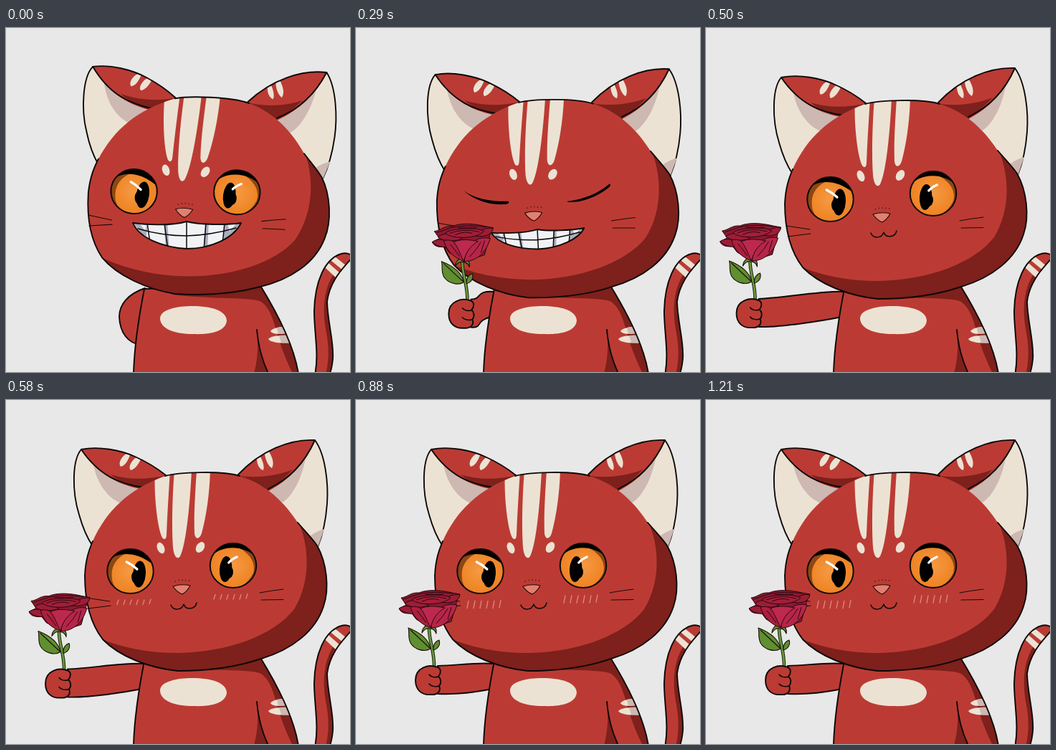
Animation, 480 px wide and 480 px high, one loop 1.25 s. Source, as an HTML page:

```html
<!DOCTYPE html>
<html lang="en">
<head>
<meta charset="utf-8">
<title>Cat with a rose</title>
<style>
  html, body { margin: 0; width: 100%; height: 100%; overflow: hidden; background: #e8e8e8; }
  svg { display: block; width: 100%; height: 100%; }
  .red { fill: #bb3b34; }
  .dark { fill: #7e201b; }
  .cream { fill: #ece2d3; }
  .mauve { fill: #cdb8b2; }
  .line { fill: none; }
  .ink { stroke: #0d0808; stroke-width: 1.9; stroke-linecap: round; stroke-linejoin: round; }
  .thin { stroke: #1c0a08; stroke-width: 1.1; stroke-linecap: round; stroke-linejoin: round; }
  .petal { stroke: #2b0710; stroke-width: 1; stroke-linejoin: round; }
  #grin path { vector-effect: non-scaling-stroke; }
</style>
</head>
<body>
<svg viewBox="0 0 480 480">
  <defs>
    <path id="skullShape" d="M222 106C240 101 300 98 326 106C365 118 390 145 407 171C420 186 428 194 434 203C447 226 452 262 443 288C432 322 400 348 356 361C318 374 280 378 240 378C200 374 158 358 135 334C115 308 110 275 110 245C111 222 116 209 121 197C140 155 170 125 222 106Z"/>
    <path id="bodyShape" d="M193 364C186 400 179 440 178 482L408 482C402 445 380 400 354 358Z"/>
    <path id="tailShape" d="M431 484C437 455 430 425 430 395C431 355 444 322 468 315C474 313 482 315 483 320C474 332 452 350 448 382C449 412 458 440 456 462C455 472 453 480 451 484Z"/>
    <path id="lips" d="M177 272C192 274 228 277 252 270C270 275 308 275 328 272C318 293 286 308 252 308C218 306 186 293 177 272Z"/>
    <clipPath id="skullClip"><use href="#skullShape"/></clipPath>
    <clipPath id="bodyClip"><use href="#bodyShape"/></clipPath>
    <clipPath id="tailClip"><use href="#tailShape"/></clipPath>
    <clipPath id="lipsClip"><use href="#lips"/></clipPath>
    <clipPath id="eyeClip"><circle r="31"/></clipPath>
    <radialGradient id="iris">
      <stop offset="0" stop-color="#f59a44"/>
      <stop offset="1" stop-color="#ee8222"/>
    </radialGradient>
  </defs>

  <g id="tail">
    <use href="#tailShape" class="red"/>
    <g clip-path="url(#tailClip)">
      <path class="dark" d="M456 345C442 368 442 396 446 420C451 445 451 462 446 484H462V345Z"/>
      <path class="cream" d="M453 324L459 319L475 332L470 338ZM445 334L450 328L466 342L461 349Z"/>
    </g>
    <use href="#tailShape" class="line ink"/>
  </g>

  <path id="arm" class="red ink"/>

  <g id="body">
    <use href="#bodyShape" class="red"/>
    <g clip-path="url(#bodyClip)">
      <path class="dark" d="M232 372C290 379 342 375 356 382C369 391 374 410 380 432C386 452 394 470 401 484H420V350H232Z"/>
      <path class="dark" d="M350 421C352 445 358 465 366 482H346C352 460 352 440 350 421Z"/>
      <path class="cream" d="M369 423C373 418 382 417 390 417L392 426C384 427 372 428 369 423ZM366 434C372 428 386 429 398 429V439C388 440 370 440 366 434Z"/>
      <path class="mauve" d="M378 418L392 416V426L380 427ZM381 429L398 428V440L384 439Z"/>
    </g>
    <path class="cream" d="M215 405C216 392 240 388 260 388C286 388 307 394 308 408C307 424 284 428 261 427C236 427 215 420 215 405Z"/>
    <path class="line ink" d="M350 421C352 445 358 465 366 482"/>
    <use href="#bodyShape" class="line ink"/>
  </g>

  <g id="head">
    <g id="leftEar">
      <path class="cream ink" d="M105 69C92 84 92 128 102 160C107 178 113 192 121 204L222 110Z"/>
      <path class="mauve" d="M121 83C124 112 140 136 160 144L205 118Z"/>
      <path class="red" d="M105 69C130 64 160 70 180 79C200 88 212 96 225 107L193 125C160 120 130 106 105 69Z"/>
      <path class="dark" d="M146 104C168 111 195 112 225 105L194 125C172 121 158 114 146 104Z"/>
      <path class="cream" d="M168 75C161 79 156 88 160 93C166 92 170 85 173 77ZM182 80C175 84 170 94 174 98C181 96 185 89 188 83Z"/>
      <path class="line ink" d="M193 122C160 118 130 106 105 69C130 64 160 70 180 79C200 88 212 96 223 105"/>
    </g>
    <g id="rightEar">
      <path class="cream ink" d="M431 56C446 76 450 118 448 145C446 172 442 188 435 205L330 110Z"/>
      <path class="mauve" d="M419 76C414 108 400 134 386 143L350 118ZM424 190C432 184 440 181 444 180L435 206Z"/>
      <path class="red" d="M431 56C396 54 355 71 322 106L366 127C392 114 416 90 431 56Z"/>
      <path class="dark" d="M322 105C348 110 378 106 400 97C390 108 378 118 366 127Z"/>
      <path class="cream" d="M350 82C350 90 354 97 359 98C361 92 358 85 355 79ZM361 75C362 84 366 92 371 95C375 88 371 79 367 72Z"/>
      <path class="line ink" d="M366 124C392 112 416 90 431 56C396 54 355 71 324 104"/>
    </g>

    <use href="#skullShape" class="red"/>
    <g clip-path="url(#skullClip)">
      <path class="dark" d="M398 152C424 190 428 250 402 292C374 328 310 352 240 353C200 353 160 346 124 330L140 400H460V180Z"/>
      <path class="cream" d="M208 98C206 130 211 178 218 192C221 196 224 194 224 188C225 160 227 130 229 98ZM235 98C232 135 231 180 233 205C234 218 239 224 243 218C252 200 257 140 259 98ZM266 98C264 130 262 160 263 186C264 195 270 195 273 186C280 160 284 130 285 98Z"/>
    </g>
    <path class="line ink" d="M222 106C240 101 300 98 326 106M407 171C420 186 428 194 434 203C447 226 452 262 443 288C432 322 400 348 356 361C318 374 280 378 240 378C200 374 158 358 135 334C115 308 110 275 110 245C111 222 116 209 121 197"/>
    <ellipse class="cream" rx="5" ry="8" transform="translate(216 206.5) rotate(-22)"/>
    <ellipse class="cream" rx="5.5" ry="8" transform="translate(271 205.5) rotate(32)"/>
    <path class="line thin" d="M112 276L145 281M114 291Q130 289 146 287M354 269Q370 266 387 264M356 279L387 278.5"/>

    <g id="open">
      <g transform="translate(173.5 239) scale(1.04 1)">
        <circle r="31" fill="url(#iris)"/>
        <g clip-path="url(#eyeClip)">
          <path fill="#8c4713" d="M-32 16V-34H28C-4 -31 -30 -18 -24 14Q-22 22 -14 30Z"/>
          <path d="M-34 -8C-26 -26 6 -33 34 -6V-36H-34Z"/>
        </g>
        <ellipse rx="8.6" ry="18.5" transform="translate(12 4) rotate(4)"/>
        <ellipse rx="5.5" ry="9" transform="translate(7 8)"/>
        <path d="M-5 -13Q3 -9 9 -3" fill="none" stroke="#fff" stroke-width="3.2" stroke-linecap="round"/>
        <circle r="31" class="line ink"/>
      </g>
      <g transform="translate(317 231) scale(1.04 1)">
        <circle r="31" fill="url(#iris)"/>
        <g clip-path="url(#eyeClip)">
          <path fill="#8c4713" d="M32 16V-34H-24C6 -31 33 -14 27 10Q22 22 10 30Z"/>
          <path d="M-34 -6C-24 -28 14 -33 34 -8V-36H-34Z"/>
        </g>
        <ellipse rx="8.3" ry="18" transform="translate(-10 5) rotate(4)"/>
        <ellipse rx="6" ry="9" transform="translate(-6 9)"/>
        <path d="M5 -12Q-2 -9 -6 -4" fill="none" stroke="#fff" stroke-width="3.2" stroke-linecap="round"/>
        <circle r="31" class="line ink"/>
      </g>
    </g>
    <path id="closed" d="M147 230C164 242 186 245 210 244C211 246 210 248 207 248C184 251 162 243 147 230ZM291 243C314 240 334 232 351 217C352 219 352 221 349 223C332 237 312 244 294 244Z"/>

    <path class="line" stroke="#4a1512" stroke-width="1" d="M236 252l.4 2M241 250.5l.4 2M246 250v2M251 250.5l-.4 2M256 251l-.4 2"/>
    <path class="thin" fill="#e27f70" d="M233 260Q245 256 257 259Q253 267 246 271Q238 268 233 260Z"/>

    <path id="smile" class="line ink" style="stroke-width:1.5" d="M230 286C233 294 245 294 248 285C251 294 264 292 266 283"/>
    <g transform="rotate(-3.7 240 378) translate(4 7)">
      <g id="grin">
        <use href="#lips" fill="#f1f2f5"/>
        <g clip-path="url(#lipsClip)">
          <path fill="#a9adbd" d="M176 270L197 274L196 290L190 288ZM220 270H225L228 310H223ZM278 270H283L281 310H276ZM304 270H330L312 292L304 296Z"/>
          <path fill="#f1f2f5" d="M186 272L197 273L194 283ZM309 273L322 272L312 284Z"/>
          <path class="line ink" style="stroke-width:1.5" d="M184 280Q218 290 252 290Q286 289 321 279M197 272L201 300M221 272L226 310M252 268V310M279 272L276 310M305 272L302 302"/>
        </g>
        <path class="line ink" d="M177 272C192 274 228 277 252 270C270 275 308 275 328 272C318 293 286 308 252 308C218 306 186 293 177 272Z"/>
      </g>
    </g>
    <path id="blush" class="line" stroke="#d9897c" stroke-width="1.3" stroke-linecap="round"/>
  </g>

  <g id="hold">
    <g id="rose">
      <path class="line" stroke="#182510" stroke-width="4.6" d="M102 316C101 335 110 350 109 374"/>
      <path class="line" stroke="#6c9a3c" stroke-width="2.6" d="M102 316C101 335 110 350 109 374"/>
      <g class="thin" fill="#5f8f30">
        <path d="M104 347C96 352 82 349 76 339C72 330 75 324 73 318C86 323 101 332 104 347Z"/>
        <path d="M108 349C107 341 112 336 116 335C118 341 115 347 108 349Z"/>
        <path d="M92 325C92 318 98 313 104 313C110 313 113 320 112 326C110 320 106 319 103 319C99 318 95 320 92 325Z"/>
      </g>
      <path class="line thin" d="M76 321C86 330 94 338 103 346"/>
      <g class="petal">
        <path fill="#8a1a2e" d="M63 276C72 275 76 268 88 269C100 264 118 265 134 269L145 271C144 276 140 279 140 283L133 309L105 318L84 306L78 298C70 298 63 298 60 291L70 286Z"/>
        <path fill="#9d1d36" d="M60 291C68 285 82 286 91 300C80 297 69 300 60 291ZM118 282C128 273 138 270 145 272C143 281 134 285 118 282ZM68 284C78 276 92 280 102 287C90 290 76 291 68 284Z"/>
        <path fill="#ab203d" d="M76 289C88 286 100 292 105 318C92 314 80 304 76 289Z"/>
        <path fill="#b62549" d="M141 286C124 282 106 292 105 318C118 318 134 310 141 286Z"/>
        <path fill="#bd294e" d="M90 291C100 286 114 288 124 290C112 297 107 306 104 318C98 306 96 298 90 291Z"/>
        <path fill="#a31e39" d="M78 279C86 271 124 270 132 276C122 286 92 288 78 279Z"/>
        <path fill="none" d="M66 278Q78 274 86 271Q108 266 136 270M84 279Q104 271 126 277M92 281Q106 275 116 279M96 271Q112 272 122 271M128 291Q122 302 112 312M85 294Q92 302 98 311M133 289L128 306"/>
      </g>
    </g>
    <path class="red ink" d="M114 373C102 368 83 373 83 391C83 405 92 412 104 411C114 412 119 406 116 399C120 394 118 388 115 386C119 381 119 375 114 373Z"/>
    <path class="line ink" style="stroke-width:1.5" d="M116 399C110 401 104 399 102 396M115 386C109 388 104 386 102 383"/>
  </g>
</svg>
<script>
  const LOOP = 1250, STEPS = 30;
  const el = id => document.getElementById(id);
  const show = (id, on) => el(id).setAttribute('visibility', on ? 'visible' : 'hidden');

  // Keys are rows of [step, ...values].
  const tilt = [[0, 3.7, -4, -7], [4, 1.74, .6, -3], [9, .35, .8, -1], [12, 0, 0, 0]];
  const reach = [[6, 160, 402], [9, 119, 392], [12, 59.5, 398], [13, 59, 398], [15, 85, 393], [17, 100, 391]];
  const mouth = [[4, 1, 1, 252.5, 272], [9, .765, .54, 254, 282]];
  const glow = [[13, 0, 0], [15, 13, -3], [17, 14, -4], [20, 10, 0]];

  function at(keys, s) {
    if (s <= keys[0][0]) return keys[0].slice(1);
    const i = keys.findIndex(k => k[0] > s);
    if (i < 0) return keys[keys.length - 1].slice(1);
    const a = keys[i - 1], b = keys[i], p = (s - a[0]) / (b[0] - a[0]);
    return a.slice(1).map((v, j) => v + (b[j + 1] - v) * p);
  }

  function armPath(s, x, y) {
    if (s >= 6) {
      const inner = Math.min(x + 45, 178);
      return `M194 368C165 366 ${inner} ${y - 21} ${x + 14} ${y - 20}V${y + 19}` +
        `C${inner} ${y + 20} 165 408 190 403`;
    }
    const q = s / 4, mix = (a, b) => a + (b - a) * q;
    return `M194 ${mix(363, 368)}C170 ${mix(371, 361)} ${mix(158, 149)} ${mix(386, 376)} ` +
      `${mix(158, 148.5)} ${mix(403, 402)}C${mix(159, 148)} ${mix(425, 428)} ${mix(170, 158)} ${mix(440, 446)} 188 442`;
  }

  function blushPath(len, dy) {
    let d = '';
    for (const [x, y] of [[157, 280.5], [292, 273]]) {
      for (let i = 0; i < 6; i++) d += `M${x + i * 9} ${y + dy + (i === 5 ? -1 : 0)}l-2 ${len}`;
    }
    return d;
  }

  function draw(now) {
    const s = Math.min(STEPS - 1, Math.floor((now % LOOP + 5.5) * STEPS / LOOP));
    const [deg, dx, dy] = at(tilt, s);
    el('head').setAttribute('transform', `translate(${dx} ${dy}) rotate(${deg} 240 378)`);

    const [x, y] = at(reach, s);
    el('arm').setAttribute('d', armPath(s, x, y));
    el('hold').setAttribute('transform', `translate(${x - 100} ${y - 391})`);
    show('hold', s >= 6);

    const shut = s >= 7 && s <= 10;
    show('open', !shut);
    show('closed', shut);

    const [sx, sy, mx, my] = at(mouth, s);
    el('grin').setAttribute('transform', `translate(${mx} ${my}) scale(${sx} ${sy}) translate(-252.5 -272)`);
    show('grin', s < 11);
    show('smile', s >= 11);

    const [len, lift] = at(glow, s);
    el('blush').setAttribute('d', blushPath(len, lift));
    show('blush', len > 0);
  }

  const start = performance.now();
  function tick() {
    draw(performance.now() - start);
    requestAnimationFrame(tick);
  }
  tick();
</script>
</body>
</html>
```
